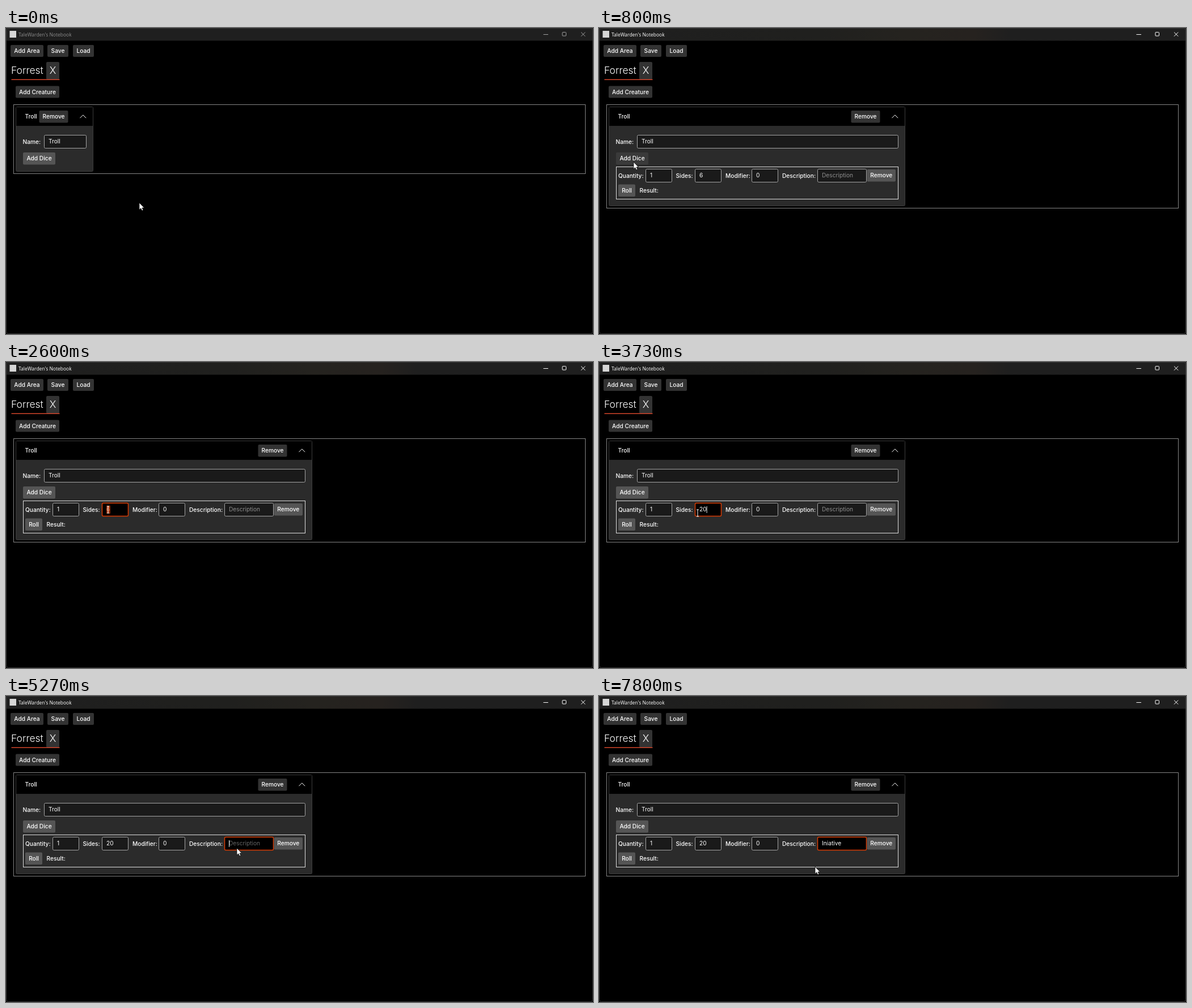
An HTML page that plays this animation: 1035x541 px, repeating every 8000 ms.

```html
<!DOCTYPE html>
<html lang="en">
<head>
<meta charset="utf-8">
<title>Dice roller</title>
<style>
  html, body { margin: 0; width: 100%; height: 100%; overflow: hidden; background: #000; }
  svg { display: block; width: 1035px; height: 541px; }
  text { font: 400 10.2px Inter, sans-serif; fill: #fff; white-space: pre; }
  .btn text { text-anchor: middle; font-weight: 500; }
  .label { font-weight: 500; }
  .tab, .btn .tab { font-size: 17.5px; font-weight: 300; }
  .title { font: 400 8.5px "Open Sans", "Noto Sans", sans-serif; }
  .line { fill: none; stroke-width: 1; }
</style>
</head>
<body>
<svg id="stage" viewBox="0 0 1035 541" xmlns="http://www.w3.org/2000/svg">
  <defs>
    <linearGradient id="bar">
      <stop offset="0" stop-color="#1f1f1f"/>
      <stop offset=".38" stop-color="#20201e"/>
      <stop offset=".52" stop-color="#25231f"/>
      <stop offset=".64" stop-color="#26221f"/>
      <stop offset=".7" stop-color="#1f1f1f"/>
    </linearGradient>
  </defs>
</svg>
<script>
const NS = "http://www.w3.org/2000/svg";
const stage = document.getElementById("stage");
const LOOP = 8000, STEP = 1000 / 15;
const ACCENT = "#d83b01", EDGE = "#a4a4a4";

function set(el, attrs) {
  for (const k in attrs) el.setAttribute(k, attrs[k]);
  return el;
}
function add(tag, attrs, parent = stage) {
  return parent.appendChild(set(document.createElementNS(NS, tag), attrs));
}
const rect = (x, y, width, height, fill, more, parent) =>
  add("rect", { x, y, width, height, fill, ...more }, parent);
const path = (d, stroke, parent) => add("path", { d, stroke, class: "line" }, parent);
function text(x, y, str, cls = "", parent = stage) {
  const el = add("text", { x, y, class: cls }, parent);
  el.textContent = str;
  return el;
}
const show = (el, on) => el.setAttribute("visibility", on ? "visible" : "hidden");

function button(x, y, w, h, str, fill = "#333", cls = "", base = y + h / 2 + 3.7) {
  const g = add("g", { class: "btn" });
  const box = rect(x, y, w, h, fill, { rx: 2 }, g);
  text(x + w / 2, base, str, cls, g);
  return { g, box };
}
function field(x, y, w, str) {
  const box = rect(x + .5, y + .5, w - 1, 23, "#1a1a1a", { rx: 2, stroke: EDGE });
  return { box, label: text(x + 8, y + 15.4, str) };
}
function style(f, state) {
  set(f.box, {
    fill: { idle: "#1a1a1a", hover: "#111", focus: "#000" }[state],
    stroke: { idle: EDGE, hover: "#d4d4d4", focus: ACCENT }[state],
    "stroke-width": state === "focus" ? 1.5 : 1
  });
}

// Window frame
const bar = rect(0, 0, 1035, 22.5, "#1f1f1f");
rect(.5, .5, 1034, 540, "none", { rx: 4, stroke: "#343434" });
rect(6.5, 5, 11.5, 12, "#d6d6d6");
const title = text(22, 14.6, "TaleWarden's Notebook", "title");
const controls = add("g", {});
path("M947.5 11.5H956", "inherit", controls);
add("rect", { x: 981, y: 7.5, width: 6.5, height: 6.5, rx: 1, class: "line" }, controls);
path("M1014 7.5l7.2 7.2M1021.2 7.5l-7.2 7.2", "inherit", controls);

// Toolbar and tab
button(8, 30, 58, 21, "Add Area");
button(73, 30, 37, 21, "Save");
button(118, 30, 37, 21, "Load");
text(9, 81.2, "Forrest", "tab");
button(71, 60, 23, 31, "X", "#333", "tab", 81.2);
rect(9.5, 90.5, 85, 1.5, "#d2452a");
button(17, 102.5, 77, 21, "Add Creature");

// Creature card
const outer = rect(13.5, 135.5, 1008, 122, "none", { stroke: "#858585" });
const card = rect(17.5, 139.5, 136, 114, "#2b2b2b", { rx: 2, stroke: "#3c3c3c" });
const head = rect(18, 140, 135, 33, "#000");
text(33.5, 160.3, "Troll", "label");
const remove = button(58.5, 146, 51, 21.5, "Remove");
const chevron = path("M130.5 159.2l5.3-5.4 5.3 5.4", "#fff");
text(29.5, 205.3, "Name:", "label");
const nameBox = field(67, 189, 75, "Troll");
const addDice = button(30, 220, 57, 21.5, "Add Dice", "#555");

// Dice row
const before = stage.childNodes.length;
rect(30.5, 245.5, 497, 57, "none", { stroke: "#dedede" });
text(34, 265.3, "Quantity:", "label");
field(82, 249, 47, "1");
text(135.5, 265.3, "Sides:", "label");
const sides = field(169, 249, 47, "6");
text(223, 265.3, "Modifier:", "label");
field(269, 249, 47, "0");
text(323, 265.3, "Description:", "label");
const desc = field(385, 249, 87, "Description");
button(472.5, 250, 50.5, 21.5, "Remove", "#555");
button(34, 276.5, 30, 21.5, "Roll", "#555");
text(71.5, 291, "Result:", "label");
const mark = rect(177, 254, 7, 14, ACCENT, { opacity: .65 });
const caret = rect(0, 255, .9, 12, "#fff");
const row = [...stage.childNodes].slice(before);
const dice = add("g", {});
dice.append(...row);

// Pointers
const arrow = add("path", {
  d: "M0 0V12.3L2.8 9.7L4.8 14L6.9 13.1L5 8.9H8.7Z",
  fill: "#fff", stroke: "#000", "stroke-width": .7
});
const beam = path("M-2 -6H2M0 -6V6M-2 6H2", "#fff");

// Pointer path: time, x, y
const moves = [
  [133, 235, 309], [533, 61, 237], [800, 61, 237], [1333, 129, 267],
  [1533, 129, 267], [1733, 143, 263], [2000, 170, 260], [2400, 184, 261],
  [2533, 184, 261], [2600, 180, 261], [2933, 174, 267], [4133, 174, 267],
  [4333, 275, 278], [4600, 407, 269], [7733, 407, 269], [7800, 381, 302]
];
// Typed text: time, string
const sidesText = [[0, "6"], [3600, "2"], [3730, "20"]];
const descText = [[0, ""], [5800, "I"], [6130, "In"], [6270, "Ini"], [6800, "Inia"],
  [7000, "Iniat"], [7130, "Iniati"], [7270, "Iniativ"], [7330, "Iniative"]];
// Caret visible between these times
const caretOn = [[2400, 2600], [3600, 4200], [4800, 5270], [5730, 6730], [6800, 7800]];

const last = (list, t) => list.filter(e => e[0] <= t).pop();
const within = (t, a, b) => t >= a && t < b;

function pointer(t) {
  const i = moves.findIndex(m => m[0] > t);
  if (i === 0) return moves[0].slice(1);
  if (i < 0) return moves[moves.length - 1].slice(1);
  const [t0, x0, y0] = moves[i - 1], [t1, x1, y1] = moves[i];
  let k = (t - t0) / (t1 - t0);
  if (t1 < 1500) k = k * k * (3 - 2 * k);
  return [x0 + (x1 - x0) * k, y0 + (y1 - y0) * k];
}

function draw(t) {
  const active = t >= 730, open = t >= 800, grow = open ? 386 : 0, drop = open ? 61 : 0;
  set(bar, { fill: active ? "url(#bar)" : "#1f1f1f" });
  title.style.fill = active ? "#fff" : "#8c8c8c";
  controls.style.stroke = active ? "#fff" : "#a0a0a0";
  set(outer, { height: 122 + drop });
  set(card, { width: 136 + grow, height: 114 + drop });
  set(head, { width: 135 + grow });
  set(nameBox.box, { width: 74 + grow });
  for (const el of [remove.g, chevron]) set(el, { transform: `translate(${grow})` });
  dice.style.display = open ? "" : "none";

  const [x, y] = pointer(t);
  const over = x >= 30 && x < 87 && y >= 220 && y < 242;
  set(addDice.box, { fill: over ? "#3a3a3a" : "#555" });

  const onSides = within(t, 2400, 4800), onDesc = t >= 4800;
  style(sides, onSides ? "focus" : within(t, 2000, 2400) ? "hover" : "idle");
  style(desc, onDesc ? "focus" : t >= 4530 ? "hover" : "idle");

  sides.label.textContent = last(sidesText, t)[1];
  const typed = last(descText, t)[1];
  desc.label.textContent = typed || "Description";
  desc.label.style.fill = typed ? "#fff" : t >= 4530 ? "#666" : "#8e8e8e";

  show(mark, within(t, 2600, 3600));
  const blink = caretOn.some(([a, b]) => within(t, a, b));
  show(caret, blink);
  if (blink) {
    const label = onDesc ? desc.label : sides.label;
    const w = onDesc && !typed ? 0 : label.getComputedTextLength();
    set(caret, { x: +label.getAttribute("x") + w });
  }

  const ibeam = within(t, 2000, 4200);
  show(arrow, !ibeam);
  show(beam, ibeam);
  set(ibeam ? beam : arrow, { transform: `translate(${x.toFixed(2)} ${y.toFixed(2)})` });
}

const start = performance.now();
function tick() {
  const t = (performance.now() - start) % LOOP;
  draw(Math.floor((t + 4) / STEP) * STEP + .5);
  requestAnimationFrame(tick);
}
tick();
</script>
</body>
</html>
```
